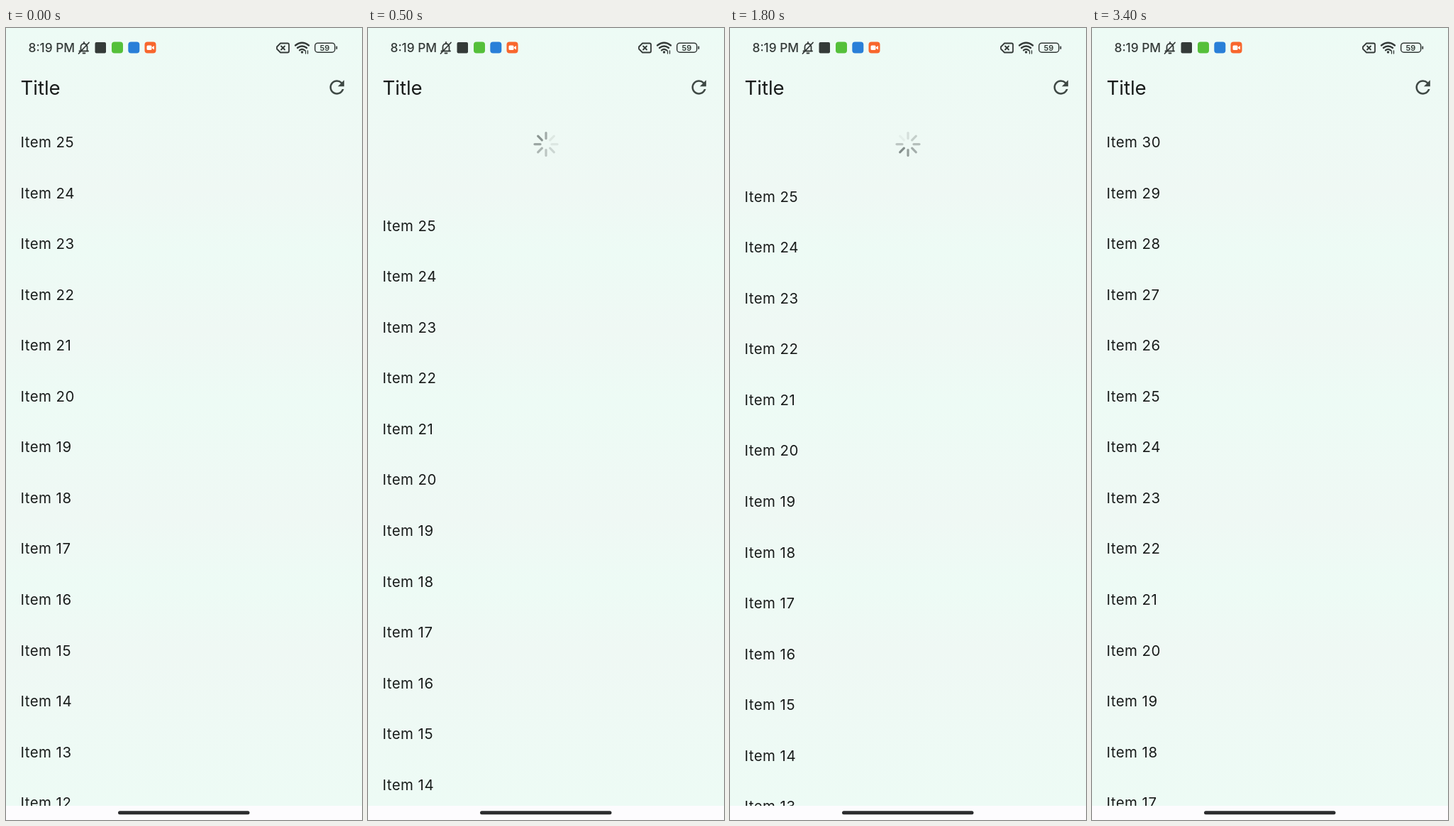
An HTML page that plays this animation: 502x1115 px, repeating every 3500 ms.

```html
<!DOCTYPE html>
<html lang="en">
<head>
<meta charset="utf-8">
<title>Pull to refresh</title>
<style>
  html, body { margin: 0; width: 100%; height: 100%; overflow: hidden; background: #eefaf5; }
  svg { display: block; width: 502px; height: 1115px; font-family: Inter, "Noto Sans", sans-serif; }
  .item { font-size: 20.4px; letter-spacing: .5px; fill: #191c1b; }
  .icon { fill: none; stroke: #343a38; stroke-width: 1.8; stroke-linecap: round; stroke-linejoin: round; }
</style>
</head>
<body>
<svg viewBox="0 0 502 1115" xmlns="http://www.w3.org/2000/svg">
  <defs>
    <linearGradient id="surface" x1="0" y1="0" x2="0" y2="1">
      <stop offset="0" stop-color="#edfbf5"/>
      <stop offset=".21" stop-color="#eff8f4"/>
      <stop offset=".29" stop-color="#edfbf5"/>
      <stop offset=".39" stop-color="#eff8f4"/>
      <stop offset=".48" stop-color="#edfbf5"/>
      <stop offset=".63" stop-color="#eff8f4"/>
      <stop offset=".72" stop-color="#edfbf5"/>
      <stop offset=".8" stop-color="#eff8f4"/>
      <stop offset="1" stop-color="#edfbf5"/>
    </linearGradient>
    <clipPath id="viewport"><rect y="124.7" width="502" height="970.3"/></clipPath>
  </defs>
  <rect width="502" height="1115" fill="#fdfcfe"/>
  <rect width="502" height="1095" fill="url(#surface)"/>

  <g id="status">
    <text x="31.5" y="34" font-size="17.3" font-weight="500" fill="#343a38">8:19 PM</text>
    <g class="icon">
      <path d="M103.5 32.5H116M105.5 32V26.5a4.5 4.5 0 0 1 9 0V32M110 20v1.5M108.5 35.5h3M117 20.5L102.500 36"/>
      <path d="M387 21.5h10a2 2 0 0 1 2 2v9a2 2 0 0 1-2 2h-10l-5-5v-3zM388 25.500l5 5M393 25.500l-5 5"/>
      <path d="M408 24.500q9.500-7.500 19 0M411 28q6.500-5 13 0M414 31.300q3.500-2.800 7 0" stroke-width="2.3"/>
      <path d="M422.500 32v4M425.500 32v4" stroke-width="1.3"/>
      <rect x="435.700" y="21.200" width="28" height="13" rx="4" stroke-width="1.5"/>
      <path d="M466.300 26.500v2.500"/>
    </g>
    <circle cx="417.500" cy="34" r="1.700" fill="#343a38"/>
    <text x="449.500" y="31.800" font-size="11" font-weight="600" text-anchor="middle" fill="#343a38">59</text>
    <rect x="125.500" y="20" width="15.500" height="15.500" rx="2" fill="#343a38"/>
    <rect x="149" y="19.500" width="16" height="16" rx="4" fill="#55c03a"/>
    <rect x="172.300" y="19.500" width="16" height="16" rx="4" fill="#297fd8"/>
    <rect x="195.500" y="19.500" width="16" height="16" rx="4" fill="#f8662d"/>
    <rect x="198.500" y="24.500" width="7" height="6.500" rx="1.500" fill="#fff"/>
    <path d="M206 27l3-2v5.500l-3-2z" fill="#fff"/>
  </g>

  <text x="20.400" y="93.500" font-size="27.600" fill="#191c1b">Title</text>
  <path transform="translate(451.300 68.200) scale(1.278)" fill="#3f4945"
    d="M17.650 6.350A7.958 7.958 0 0 0 12 4c-4.420 0-7.990 3.580-7.990 8s3.570 8 7.990 8c3.730 0 6.840-2.550 7.730-6h-2.080A5.990 5.990 0 0 1 12 18c-3.310 0-6-2.690-6-6s2.690-6 6-6c1.660 0 3.140.690 4.220 1.780L13 11h7V4z"/>

  <g clip-path="url(#viewport)">
    <g id="spinner" stroke="#3c4543" stroke-width="3.200" stroke-linecap="round"></g>
    <g id="list"></g>
  </g>
  <rect x="158" y="1102.300" width="185.500" height="5" rx="2.500" fill="#2b2c2e"/>
</svg>
<script>
const LOOP = 3500, STEP = 100;
const LIST_TOP = 124.7, ROW = 71.55, BASELINE = 168;
const PULLED = 141, HEADER = 76.7;
const RELEASE = 453, LOADED = 2090;

const spinner = document.getElementById('spinner');
const list = document.getElementById('list');

function add(parent, tag, attrs) {
  const el = document.createElementNS('http://www.w3.org/2000/svg', tag);
  for (const key in attrs) el.setAttribute(key, attrs[key]);
  return parent.appendChild(el);
}

const ticks = Array.from({ length: 8 }, (_, i) =>
  add(spinner, 'path', { d: 'M0-8V-16', transform: `rotate(${i * 45})` }));
const rows = Array.from({ length: 14 }, (_, i) =>
  add(list, 'text', { class: 'item', x: 20.4, y: BASELINE + i * ROW }));

// Critically damped spring, from 1 towards 0.
const spring = (ms, speed) => {
  const x = Math.max(0, ms) / 1000 * speed;
  return (1 + x) * Math.exp(-x);
};

function listOffset(t) {
  if (t < RELEASE) return PULLED * Math.min(1, t / 190);
  if (t < 700) return HEADER + (PULLED - HEADER) * spring(t - RELEASE, 27);
  if (t < 2500) return HEADER * spring(t - LOADED, 20.5);
  return 0;
}

// Brightest at the head, fading along the tail, then quickly back up.
function tickAlpha(age) {
  const level = age < 6.3 ? 1 - age / 6.3 : (age - 6.3) / 1.7;
  return 0.03 + 0.57 * level;
}

function render(t) {
  const offset = listOffset(t);
  list.setAttribute('transform', `translate(0 ${offset.toFixed(2)})`);
  const first = t < LOADED ? 25 : 30;
  rows.forEach((row, i) => { row.textContent = `Item ${first - i}`; });

  const reveal = Math.min(1, offset / HEADER);
  const scale = t < LOADED ? 1 : reveal;
  const centre = LIST_TOP + HEADER / 2 * reveal + 0.5;
  const head = t < 600 ? 7.5 : 7 + (t - 700) / 1100 * 14.05;
  spinner.setAttribute('transform', `translate(251 ${centre}) scale(${scale})`);
  spinner.setAttribute('opacity', t < RELEASE ? Math.min(1, offset / 128) : reveal < 0.1 ? 0 : 1);
  ticks.forEach((tick, i) => {
    const age = ((head - i) % 8 + 8) % 8;
    tick.setAttribute('stroke-opacity', tickAlpha(age).toFixed(3));
  });
}

const start = performance.now();
function frame(now) {
  const t = Math.max(0, now - start) % LOOP;
  render(Math.floor(t / STEP) * STEP);
  requestAnimationFrame(frame);
}
render(0);
requestAnimationFrame(frame);
</script>
</body>
</html>
```
